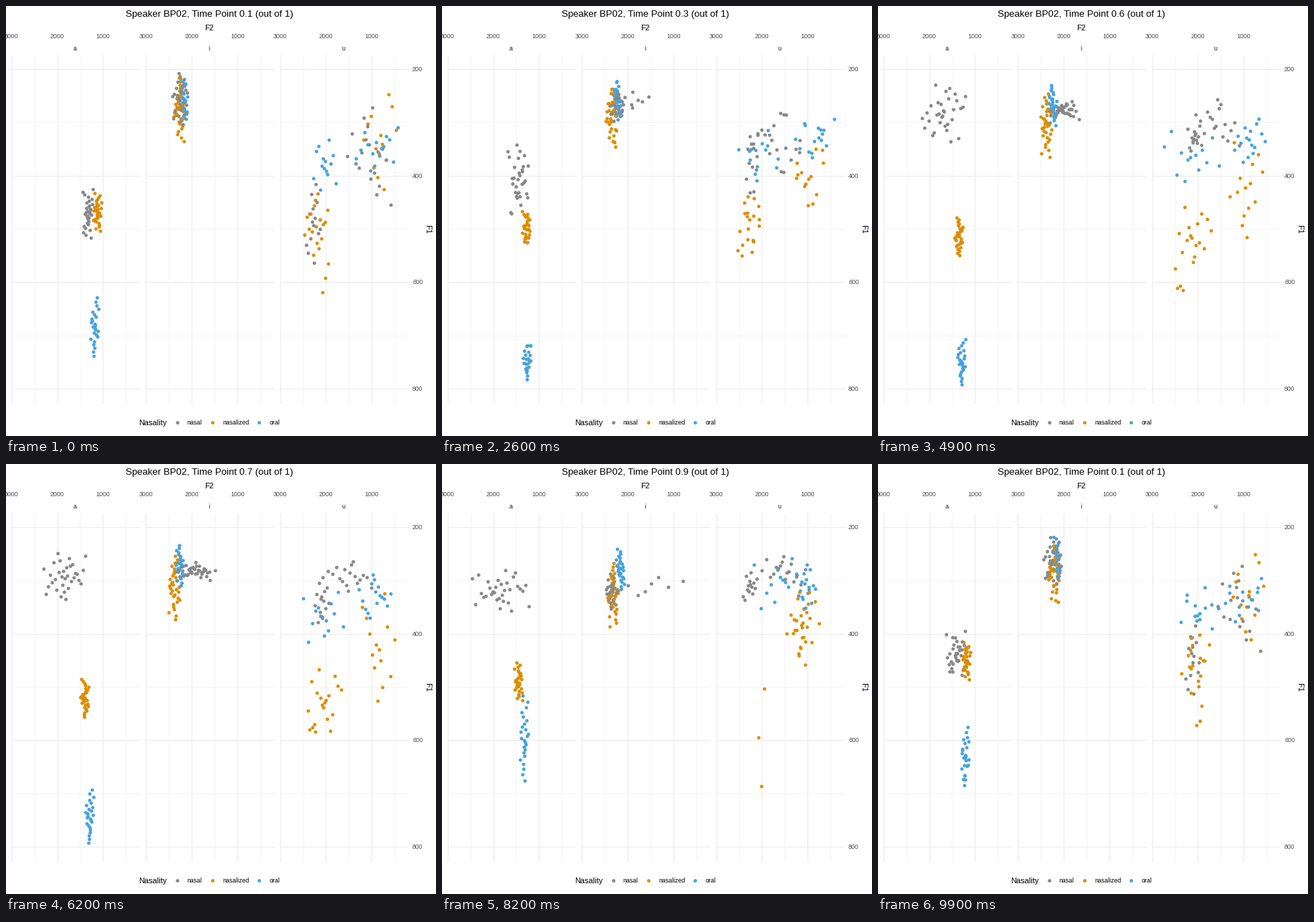
These frames come from a looping animation (600x600 px, 10000 ms). A matplotlib script:

```python
import numpy as np
import matplotlib.pyplot as plt
from matplotlib.animation import FuncAnimation

plt.rcParams["font.family"] = "Liberation Sans"

SIZE, PT = 600, 0.72          # stage in pixels, points per pixel at 100 dpi
GREY, ORANGE, BLUE = "#888888", "#DD8D00", "#46A2E0"

rng = np.random.default_rng(12)
dot_tracks, dot_colours = [], []


def spread(key):
    """Evenly ranked offsets in -1..1, denser near zero."""
    n = len(key)
    rank = np.argsort(np.argsort(key + 0.4 * rng.random(n)))
    u = (2 * rank + 1) / n - 1
    return u * (0.55 + 0.45 * u * u)


def cloud(colour, n, xs, ys, rx, ry):
    """A cluster of n dots: centres and half sizes at seven key poses."""
    keys = rng.random((2, n))
    poses = []
    for x, y, w, h in np.broadcast(xs, ys, rx, ry):
        poses.append(np.column_stack((x + w * spread(keys[0]),
                                      y + h * spread(keys[1]))))
    p1, p2, p4, p6, p7, p9, p10 = poses
    p3, p5, p8 = (p2 + p4) / 2, (p4 + p6) / 2, (p7 + p9) / 2
    p2 = p2 + (p2 - p3) / 4
    p4 = p4 + (p4 - p5) / 4
    p6 = p6 + (p6 - p5) / 4
    dot_tracks.append(np.array([p1, p2, p3, p4, p5, p6, p7, p8, p9, p10]))
    dot_colours.extend([colour] * n)


# vowel a
cloud(GREY, 32, [115, 109, 105, 92, 82, 82, 88],
      [290, 285, 212, 150, 157, 177, 168],
      [8, 6, 22, 32, 31, 42, 48], [36, 43, 60, 42, 34, 30, 26])
cloud(ORANGE, 31, [128, 120, 116, 113, 110, 107, 106],
      [288, 304, 314, 322, 327, 304, 222], 6, 28)
cloud(BLUE, 25, [124, 121, 118, 117, 117, 115, 114],
      [448, 491, 498, 497, 492, 383, 255], 6, [44, 34, 25, 34, 40, 64, 50])

# vowel i
cloud(GREY, 30, [243, 236, 250, 256, 260, 237, 245],
      [130, 139, 142, 146, 150, 178, 160],
      [11, 9, 12, 18, 26, 8, 20], [38, 33, 14, 10, 9, 26, 25])
cloud(GREY, 8, [245, 247, 281, 270, 275, 288, 260],
      [145, 135, 132, 146, 150, 171, 170], [8, 27, 26, 14, 22, 62, 40], 16)
cloud(ORANGE, 32, [242, 239, 235, 235, 235, 239, 258],
      [145, 147, 160, 167, 173, 183, 178], 8, 47)
cloud(BLUE, 28, [248, 247, 244, 244, 243, 249, 256],
      [130, 132, 133, 139, 142, 147, 128], 6, 30)

# vowel u: front and back clusters, plus a few strays
cloud(GREY, 14, [429, 432, 435, 442, 441, 430, 480],
      [304, 245, 190, 185, 190, 171, 155], 11, [63, 88, 45, 20, 36, 22, 45])
cloud(GREY, 17, [507, 478, 470, 474, 480, 477, 490],
      [210, 210, 175, 163, 157, 149, 155], 34, [76, 60, 48, 36, 23, 22, 45])
cloud(ORANGE, 3, [446, 405, 425, 422, 428, 446, 460],
      [380, 300, 370, 394, 371, 382, 250], 8, [40, 25, 8, 6, 6, 136, 50])
cloud(ORANGE, 17, [433, 428, 433, 440, 445, 502, 484],
      [305, 300, 302, 324, 330, 222, 165], [18, 16, 18, 28, 26, 13, 36], 48)
cloud(ORANGE, 14, [522, 518, 508, 514, 520, 504, 490],
      [190, 220, 252, 257, 256, 230, 170], 26, [76, 58, 46, 76, 86, 58, 50])
cloud(BLUE, 14, [445, 440, 445, 438, 443, 474, 450],
      [222, 212, 207, 210, 214, 167, 150], [18, 28, 36, 44, 32, 44, 60], 40)
cloud(BLUE, 16, [518, 518, 522, 519, 515, 508, 475],
      [200, 180, 187, 188, 185, 171, 150], [33, 34, 28, 24, 25, 15, 60], 34)

track = np.concatenate(dot_tracks, axis=1)
order = rng.permutation(len(dot_colours))
track, colours = track[:, order], np.array(dot_colours)[order]

fig = plt.figure(figsize=(6, 6), dpi=100, facecolor="white")
ax = fig.add_axes([0, 0, 1, 1])
ax.set(xlim=(0, SIZE), ylim=(SIZE, 0))
ax.axis("off")


def label(x, y, text, px=8.8, color="black", ha="center", **kw):
    kw.setdefault("va", "baseline")
    return ax.text(x, y, text, fontsize=px * PT, color=color, ha=ha, **kw)


def rule(xs, ys, major):
    ax.plot(xs, ys, color="#EBEBEB", lw=(1.07 if major else 0.53) * PT,
            zorder=1, solid_capstyle="butt")


def f1_y(f1):
    return 88 + (f1 - 200) * 0.7437


for panel, vowel in enumerate("aiu"):
    left = 7 + 187.4 * panel
    label(left + 89, 62, vowel, color="#1A1A1A")
    for f1 in range(200, 801, 100):
        rule((left, left + 180), (f1_y(f1),) * 2, f1 % 200 == 0)
    for f2 in range(3000, 499, -500):
        x = left + 0.9 + (3000 - f2) * 0.0637
        rule((x, x), (68, 555), f2 % 1000 == 0)
        if f2 % 1000 == 0:
            label(x, 45, f2, color="#4D4D4D")

for f1 in range(200, 801, 200):
    label(567, f1_y(f1) + 3, f1, color="#4D4D4D", ha="left")

title = label(283.7, 15, "", 13.2)
label(283.7, 34, "F2", 11)
label(588, 311.5, "F1", 11, rotation=270, va="center")

label(185, 585, "Nasality", 11, ha="left")
DOT = (4.8 * PT) ** 2
for x, name, colour in ((238.5, "nasal", GREY), (288.3, "nasalized", ORANGE),
                        (353.3, "oral", BLUE)):
    ax.scatter(x, 580.5, s=DOT, c=colour, linewidths=0)
    label(x + 14, 584, name, ha="left")

dots = ax.scatter(*track[0].T, s=DOT, c=colours, linewidths=0, zorder=3)


def draw(k):
    now = k // 10
    after = (now + 1) % 10
    p = max(0, (k % 10 - 5) / 5)      # hold half the time, then glide
    dots.set_offsets((1 - p) * track[now] + p * track[after])
    point = (now if p < 0.5 else after) + 1
    title.set_text(f"Speaker BP02, Time Point {point / 10:g} (out of 1)")
    return dots, title


anim = FuncAnimation(fig, draw, frames=100, interval=100, repeat=True,
                     repeat_delay=0, blit=False)
plt.show()
```
